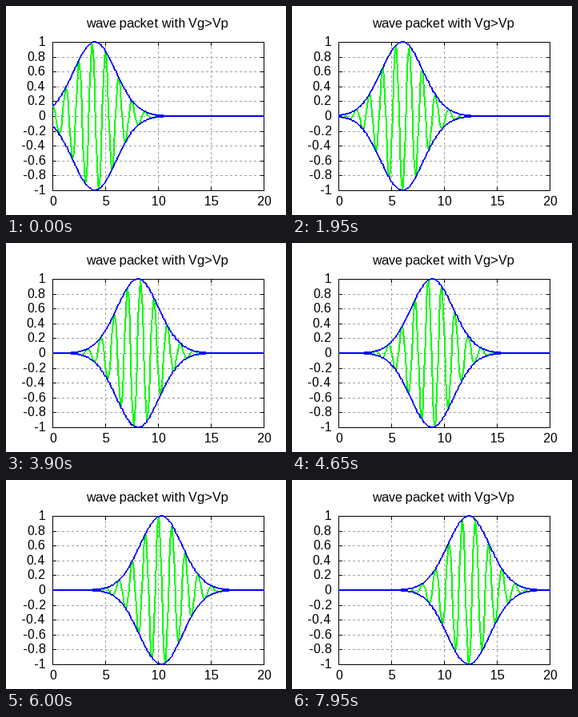
These frames come from a looping animation (350 px wide and 262 px high, 8 s). A matplotlib script:

```python
import numpy as np
import matplotlib.pyplot as plt
from matplotlib.animation import FuncAnimation

W, H = 350, 262
LEFT, RIGHT, TOP, BOTTOM = 58, 322, 45, 231
TICK = 4
STEP_MS, INTERVAL, LOOP_MS = 150, 50, 8000
FONT = dict(family="Liberation Sans", fontsize=16, color="black")
GREEN, BLUE = (0, 255, 0, 255), (0, 0, 255, 255)

# Whole-pixel glyph advances
plt.rcParams["text.hinting"] = "force_autohint"
plt.rcParams["text.hinting_factor"] = 1

fig = plt.figure(figsize=(W / 72, H / 72), dpi=72, facecolor="white")
ax = fig.add_axes([0, 0, 1, 1])
ax.axis("off")


def to_px(x):
    return np.rint(LEFT + (RIGHT - LEFT) * x / 20).astype(int)


def to_py(y):
    return BOTTOM - np.rint((BOTTOM - TOP) * (y + 1) / 2).astype(int)


def rule(x0, y0, x1, y1, color="black", dashes="-"):
    """One-pixel horizontal or vertical line, both end pixels included."""
    if y0 == y1:
        xs, ys = [x0, x1 + 1], [y0 + .5, y0 + .5]
    else:
        xs, ys = [x0 + .5, x0 + .5], [y0, y1 + 1]
    ax.plot(xs, ys, color=color, lw=1, ls=dashes, antialiased=False,
            snap=False, solid_capstyle="butt", dash_capstyle="butt")


def label(x, y, text, align):
    ax.text(x, y, text, ha=align, va="baseline", **FONT)


def draw_curve(pixels, px, py, color):
    """Polyline with a hard-edged pen two pixels wide."""
    for x0, y0, x1, y1 in zip(px[:-1], py[:-1], px[1:], py[1:]):
        dx, dy = abs(x1 - x0), abs(y1 - y0)
        count = max(dx, dy) + 1
        xs = np.rint(np.linspace(x0, x1, count)).astype(int)
        ys = np.rint(np.linspace(y0, y1, count)).astype(int)
        pixels[ys, xs] = color
        if dy > dx:
            pixels[ys, xs - 1] = color
        else:
            pixels[ys - 1, xs] = color


GRID = dict(color="#a0a0a0", dashes=(0, (2, 3)))

for value in range(0, 21, 5):
    px = to_px(value)
    if 0 < value < 20:
        rule(px, TOP, px, BOTTOM, **GRID)
    rule(px, BOTTOM - TICK, px, BOTTOM)
    rule(px, TOP, px, TOP + TICK)
    label(px + 1, 250, str(value), "center")

for i in range(-5, 6):
    py = to_py(i / 5)
    if abs(i) < 5:
        rule(LEFT, py, RIGHT, py, **GRID)
    rule(LEFT, py, LEFT + TICK, py)
    rule(RIGHT - TICK, py, RIGHT, py)
    label(49.5, py + 5, f"{i / 5:g}", "right")

for y in (TOP, BOTTOM):
    rule(LEFT, y, RIGHT, y)
for x in (LEFT, RIGHT):
    rule(x, TOP, x, BOTTOM)

label(189.5, 27, "wave packet with Vg>Vp", "center")

layer = ax.imshow(np.zeros((H, W, 4), np.uint8), extent=(0, W, H, 0),
                  interpolation="nearest", aspect="auto", zorder=3)
ax.set_xlim(0, W)
ax.set_ylim(H, 0)

samples = np.linspace(0, 20, 200)
sample_px = to_px(samples)


def update(frame):
    t = 2 * np.pi * (frame * INTERVAL // STEP_MS) / 40
    envelope = np.exp(-(samples - 4 - t) ** 2 / 8)
    wave = envelope * np.cos(5 * samples - t)
    pixels = np.zeros((H, W, 4), np.uint8)
    for values, color in ((wave, GREEN), (envelope, BLUE), (-envelope, BLUE)):
        draw_curve(pixels, sample_px, to_py(values), color)
    layer.set_data(pixels)
    return layer,


anim = FuncAnimation(fig, update, frames=LOOP_MS // INTERVAL,
                     interval=INTERVAL, repeat=True, repeat_delay=0)
plt.show()
```
